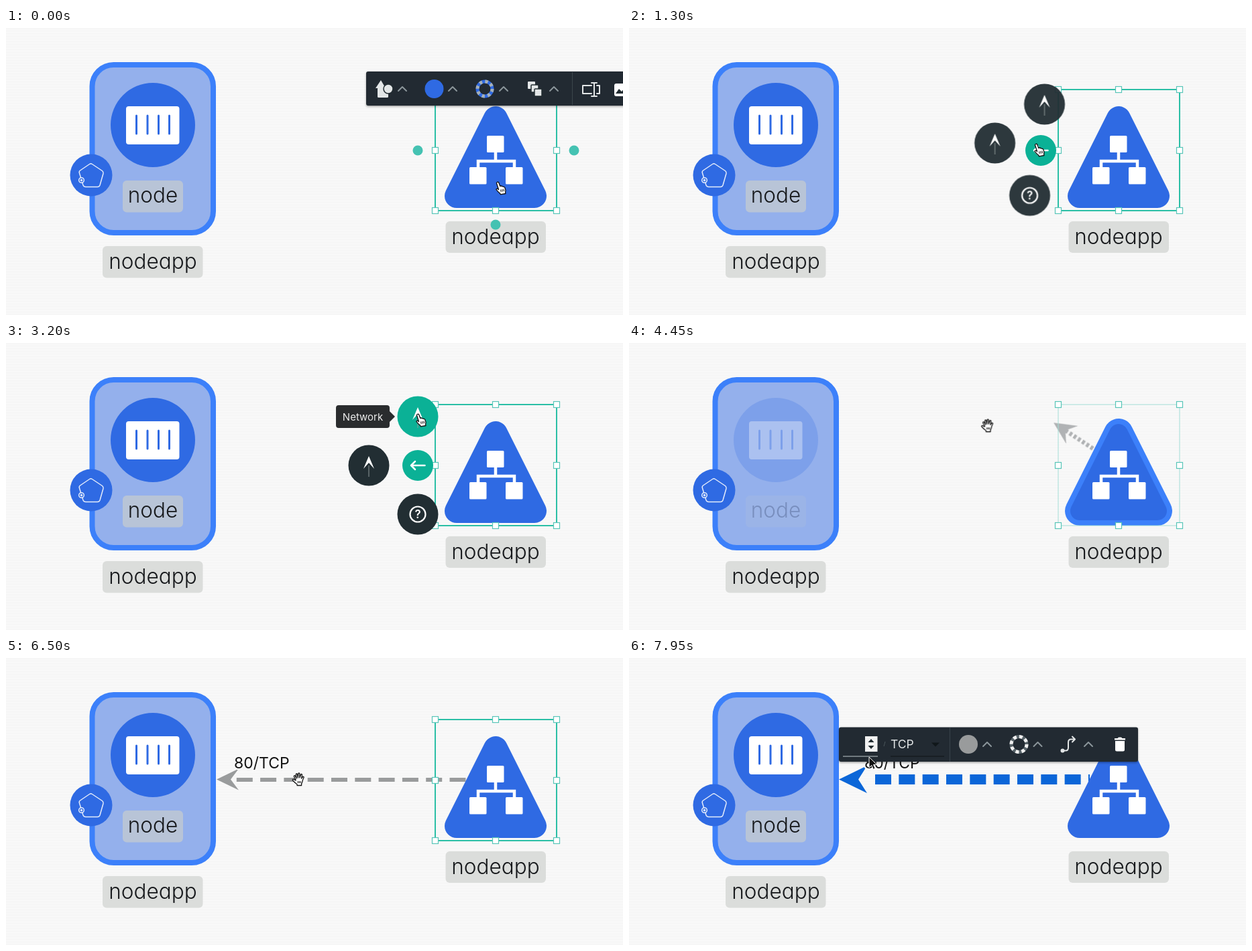
These frames come from a looping animation (920 by 429 pixels, 8000 ms). An HTML page:

```html
<!DOCTYPE html>
<html lang="en">
<head>
<meta charset="utf-8">
<title>Connecting nodes</title>
<style>
  html, body { margin: 0; width: 100%; height: 100%; overflow: hidden; background: #f7f7f7; }
  svg { display: block; width: 100vw; height: 100vh; font-family: Inter, "Open Sans", sans-serif; }
  .name { font-size: 31.5px; font-weight: 350; fill: #17191c; text-anchor: middle; font-feature-settings: "cv11"; }
  .tip { font-size: 15px; fill: #ececec; text-anchor: middle; font-feature-settings: "cv11"; }
  .port { font-size: 23px; fill: #141414; stroke: #f9f9f9; stroke-width: 5px; stroke-linejoin: round; paint-order: stroke; }
  .line { fill: none; stroke-linecap: round; stroke-linejoin: round; }
  .dark { fill: #222c31; }

  /* hard on/off changes */
  .step { animation: 8s step-end infinite; }
  .first { animation-name: first; }
  .full { animation-name: full; }
  .dim { animation-name: dim; }
  .handles { animation-name: handles; }
  .tipA { animation-name: tipA; }
  .tipN { animation-name: tipN; }
  .hoverA { animation-name: hoverA; }
  .hoverN { animation-name: hoverN; }
  .link { animation-name: link; }
  .picked { animation-name: picked; }
  .point { animation-name: point; }
  .grab { animation-name: grab; }
  .arrow { animation-name: arrow; }
  @keyframes first { 0% { opacity: 1 } 12.5%, 100% { opacity: 0 } }
  @keyframes full { 0% { opacity: 1 } 45.6% { opacity: 0 } 74.4% { opacity: 1 } 96.25%, 100% { opacity: 0 } }
  @keyframes dim { 0% { opacity: 0 } 45.6% { opacity: 1 } 74.4%, 100% { opacity: 0 } }
  @keyframes handles { 0% { opacity: 1 } 96.25%, 100% { opacity: 0 } }
  @keyframes tipA { 0% { opacity: 0 } 26.9% { opacity: 1 } 34.4%, 100% { opacity: 0 } }
  @keyframes tipN { 0% { opacity: 0 } 38.1% { opacity: 1 } 45.6%, 100% { opacity: 0 } }
  @keyframes hoverA { 0% { fill: #222e33 } 26.2% { fill: #0bb196 } 34.4%, 100% { fill: #222e33 } }
  @keyframes hoverN { 0% { fill: #222e33 } 37.5% { fill: #0bb196 } 45.6%, 100% { fill: #222e33 } }
  @keyframes link { 0% { opacity: 0 } 74.4% { opacity: 1 } 96.25%, 100% { opacity: 0 } }
  @keyframes picked { 0% { opacity: 0 } 96.25%, 100% { opacity: 1 } }
  @keyframes point { 0% { opacity: 1 } 45.6%, 100% { opacity: 0 } }
  @keyframes grab { 0% { opacity: 0 } 45.6% { opacity: 1 } 97.5%, 100% { opacity: 0 } }
  @keyframes arrow { 0% { opacity: 0 } 97.5%, 100% { opacity: 1 } }

  /* dial items fan out from the right, angle and radius together */
  .item { animation: fan 8s cubic-bezier(.215, .61, .355, 1) infinite; }
  .hub { animation: hub 8s cubic-bezier(.215, .61, .355, 1) infinite; }
  @keyframes fan {
    0%, 13% { opacity: 0; transform: rotate(0deg) translateX(0px) rotate(0deg) }
    18%, 45.6% { opacity: 1; transform: rotate(var(--a)) translateX(73px) rotate(calc(-1 * var(--a))) }
    45.61%, 100% { opacity: 0; transform: rotate(var(--a)) translateX(73px) rotate(calc(-1 * var(--a))) }
  }
  @keyframes hub {
    0%, 12.49% { opacity: 0; transform: scale(.36) }
    12.5% { opacity: 1; transform: scale(.36) }
    15%, 45.6% { opacity: 1; transform: scale(1) }
    45.61%, 100% { opacity: 0; transform: scale(1) }
  }

  .inside { animation: inside 8s linear infinite; }
  @keyframes inside { 0%, 45.6% { opacity: 1 } 48%, 74.2% { opacity: .22 } 75.6%, 100% { opacity: 1 } }

  /* dragged connector: swing and reach */
  .swing { animation: swing 8s ease-in-out infinite; }
  .reach { animation: reach 8s ease-in-out infinite; }
  .drag { animation: drag 8s step-end infinite; }
  @keyframes drag { 0% { opacity: 0 } 46.5% { opacity: 1 } 74.4%, 100% { opacity: 0 } }
  @keyframes swing { 0%, 55.7% { transform: rotate(33.4deg) } 61.9%, 100% { transform: rotate(.2deg) } }
  @keyframes reach { 0%, 55.7% { transform: translateX(-116px) } 61.9%, 100% { transform: translateX(-416px) } }

  .bar2 { animation: bar2 8s linear infinite; }
  @keyframes bar2 { 0%, 96.25% { opacity: 0 } 98.2%, 100% { opacity: 1 } }

  .cursor { animation: cursor 8s ease-in-out infinite; }
  @keyframes cursor {
    0%, 4% { transform: translate(729px, 229px) }
    12% { transform: translate(606px, 174px) }
    16%, 22.5% { transform: translate(603px, 172px) }
    26.9%, 33.75% { transform: translate(536px, 165px) }
    38.75%, 46% { transform: translate(610px, 105px) }
    52.5% { transform: translate(600px, 106px); animation-timing-function: ease-in }
    55.63% { transform: translate(525px, 113px); animation-timing-function: ease-out }
    62%, 74.4% { transform: translate(215px, 186px) }
    80%, 84.4% { transform: translate(426px, 171px) }
    93.75%, 96.25% { transform: translate(398px, 170px) }
    99.2%, 100% { transform: translate(358px, 148px) }
  }
</style>
</head>
<body>
<svg viewBox="0 0 920 429">
  <defs>
    <pattern id="linen" width="4" height="4" patternUnits="userSpaceOnUse">
      <rect width="4" height="4" fill="#f8f8f8"/>
      <rect width="4" height="1" fill="#f5f5f5"/>
    </pattern>
    <filter id="shade" x="-5%" y="-20%" width="110%" height="150%">
      <feDropShadow dx="0" dy="1.5" stdDeviation="1.5" flood-opacity=".35"/>
    </filter>
    <clipPath id="left"><rect x="-700" y="-60" width="700" height="120"/></clipPath>
    <path id="tri" d="M730 135 788 251H672Z" stroke-linejoin="round"/>
    <path id="head" d="M0 0 33-16 21 0 33 16Z"/>
    <path id="chev" class="line" d="M-6 3 0-3 6 3" stroke="#8b959a" stroke-width="2"/>
    <rect id="grip" x="-4.5" y="-4.5" width="9" height="9" fill="#fff" stroke="#58c5b8" stroke-width="1.2"/>
    <g id="up">
      <path d="M0 0V17" stroke="#8d9699" stroke-width="1"/>
      <path d="M0-14 8 5 0-4-8 5Z" fill="#fff"/>
    </g>
  </defs>

  <rect width="920" height="429" fill="url(#linen)"/>

  <!-- container group -->
  <rect x="128.5" y="55" width="180.500" height="251" rx="32" fill="#94b0ec" stroke="#3c80fa" stroke-width="8"/>
  <g class="inside">
    <circle cx="219" cy="145" r="63" fill="#2f6ae3"/>
    <rect x="179" y="117" width="79.500" height="57" rx="4" fill="#fff"/>
    <path class="line" d="M194.500 131V158M211 131V158M227.500 131V158M243.500 131V158" stroke="#2f6ae3" stroke-width="3"/>
    <rect x="174" y="228" width="90" height="47.500" rx="6" fill="#b8c4d7"/>
    <text class="name" x="219" y="261">node</text>
  </g>
  <circle cx="127" cy="220" r="31.500" fill="#2f6ae3"/>
  <g class="line" stroke="#e4ecfb" stroke-width="1.500">
    <path d="M124.500 203.500Q126.500 202 128.500 203.500L143.500 213.500Q145.500 215 145 217.500L140 235Q139 237.500 136.500 237.500H119Q116 237.500 115 235L109.500 217Q108.500 214.500 110.500 213Z"/>
    <circle cx="112.500" cy="227.500" r="3.800" fill="#2f6ae3"/>
    <circle cx="112.500" cy="227.500" r="1"/>
  </g>
  <rect x="144" y="326" width="149.500" height="47.500" rx="6" fill="#dbdddb"/>
  <text class="name" x="219" y="360">nodeapp</text>

  <!-- dragged connector -->
  <g class="drag" fill="#b0b2b4">
    <g transform="translate(730 183)">
      <g class="swing">
        <g clip-path="url(#left)">
          <g class="reach">
            <path d="M21 0H430" stroke="#b0b2b4" stroke-width="6.500" stroke-dasharray="4.300 3.200"/>
            <use href="#head"/>
          </g>
        </g>
      </g>
    </g>
  </g>

  <!-- finished connector -->
  <g class="step link">
    <path d="M343.800 182H686" stroke="#999b9c" stroke-width="6" stroke-dasharray="24 11.300"/>
    <use href="#head" x="314" y="181.500" fill="#999b9c"/>
    <text class="port" x="340" y="165">80/TCP</text>
  </g>
  <g class="step picked">
    <path d="M367 181.500H687" stroke="#0b66d8" stroke-width="15" stroke-dasharray="24 11.330"/>
    <path d="M313 181.500 355 161 342 181.500 355 202Z" fill="#0b66d8"/>
    <text class="port" x="351" y="164.500">80/TCP</text>
  </g>

  <!-- triangle -->
  <use href="#tri" fill="#2f6ae3" stroke="#2f6ae3" stroke-width="36"/>
  <g class="step dim">
    <use href="#tri" fill="#3c80fa" stroke="#3c80fa" stroke-width="44"/>
    <use href="#tri" fill="#2f6ae3" stroke="#2f6ae3" stroke-width="28"/>
  </g>
  <g fill="#fff">
    <rect x="717" y="161" width="25.500" height="25" rx="1.500"/>
    <rect x="691" y="208" width="25.500" height="25.500" rx="1.500"/>
    <rect x="745" y="208" width="25.500" height="25.500" rx="1.500"/>
    <path d="M730 185V199M704 209V199H758V209" fill="none" stroke="#fff" stroke-width="4.500"/>
  </g>
  <rect x="655.500" y="289" width="149.500" height="47" rx="6" fill="#dbdddb"/>
  <text class="name" x="730" y="322.500">nodeapp</text>

  <!-- selection -->
  <rect class="step full" x="640" y="92" width="181" height="181" fill="none" stroke="#2bbfa6" stroke-width="2"/>
  <rect class="step dim" x="640" y="92" width="181" height="181" fill="none" stroke="#a3ddd6" stroke-width="1"/>
  <g class="step handles">
    <use href="#grip" x="640" y="92"/><use href="#grip" x="730" y="92"/><use href="#grip" x="821" y="92"/>
    <use href="#grip" x="640" y="183"/><use href="#grip" x="821" y="183"/>
    <use href="#grip" x="640" y="273"/><use href="#grip" x="730" y="273"/><use href="#grip" x="821" y="273"/>
  </g>
  <g class="step first" fill="#45c2b2">
    <circle cx="614" cy="183" r="7.500"/><circle cx="847" cy="183" r="7.500"/><circle cx="730" cy="294" r="7.500"/>
  </g>

  <!-- shape toolbar -->
  <g class="step first">
    <rect class="dark" x="537" y="65" width="400" height="51" rx="3" filter="url(#shade)"/>
    <g fill="#e3e6e7">
      <path d="M559 78 566 90H551Z"/>
      <rect x="554" y="89" width="16" height="15" rx="1.500"/>
      <circle cx="570" cy="91" r="7" stroke="#222c31" stroke-width="1.500"/>
      <rect x="778" y="80" width="11" height="11" rx="1"/>
      <rect x="783" y="85" width="11" height="11" rx="1" stroke="#222c31" stroke-width="1.500"/>
      <rect x="788" y="91" width="11" height="11" rx="1" stroke="#222c31" stroke-width="1.500"/>
    </g>
    <circle cx="638.500" cy="91" r="14" fill="#2f6ae3"/>
    <circle cx="714" cy="91" r="11" fill="none" stroke="#2f6ae3" stroke-width="5"/>
    <circle cx="714" cy="91" r="11" fill="none" stroke="#a5b0b8" stroke-width="5" stroke-dasharray="4.320"/>
    <use href="#chev" x="591" y="91"/><use href="#chev" x="666" y="91"/>
    <use href="#chev" x="742" y="91"/><use href="#chev" x="817" y="91"/>
    <path d="M844.500 66V115" stroke="#3a454a"/>
    <path class="line" d="M873 86H860V98H873M881 86H885V98H881M873 82H881M877 82V102M873 102H881" stroke="#e3e6e7" stroke-width="2"/>
    <rect x="907" y="83" width="22" height="19" rx="3" fill="#fff"/>
    <path class="dark" d="M909 98 914 91 918 95 922 90V98Z"/>
  </g>

  <!-- radial menu -->
  <g transform="translate(614 183)">
    <g class="item" style="--a:-270deg">
      <circle r="30.500" fill="#222e33"/>
      <circle r="11.500" fill="none" stroke="#fff" stroke-width="2.200"/>
      <text y="6" font-size="17" font-weight="600" text-anchor="middle" fill="#fff">?</text>
    </g>
    <g class="item" style="--a:-180deg">
      <circle class="step hoverA" r="30.500" fill="#222e33"/>
      <use href="#up"/>
    </g>
    <g class="item" style="--a:-90deg">
      <circle class="step hoverN" r="30.500" fill="#222e33"/>
      <use href="#up"/>
    </g>
    <g class="hub">
      <circle r="23" fill="#0bb196"/>
      <path class="line" d="M10.500 0H-10M-4-6-10 0-4 6" stroke="#fff" stroke-width="2.500"/>
    </g>
  </g>
  <g class="step tipA">
    <path d="M405 165H494.500Q498.500 165 498.500 169V175L507 183 498.500 191V195Q498.500 199 494.500 199H405Q401 199 401 195V169Q401 165 405 165Z" fill="#2a2c2e"/>
    <text class="tip" x="450" y="188">Annotation</text>
  </g>
  <g class="step tipN">
    <path d="M496 93H568Q572 93 572 97V102L580 110 572 118V123Q572 127 568 127H496Q492 127 492 123V97Q492 93 496 93Z" fill="#2a2c2e"/>
    <text class="tip" x="532" y="115.500">Network</text>
  </g>

  <!-- connector toolbar -->
  <g class="bar2">
    <rect class="dark" x="313" y="103.500" width="446" height="51.500" rx="3" filter="url(#shade)"/>
    <path d="M319 147H371" stroke="#8b9499" stroke-width="1.500"/>
    <path d="M390 147H470" stroke="#141b1f" stroke-width="1.500"/>
    <rect x="352" y="117" width="18.500" height="23" fill="#f2f2f2"/>
    <path class="dark" d="M361 121 365.500 126H356.500ZM361 136 365.500 131H356.500Z"/>
    <path d="M380 132 382 125" stroke="#4b565b"/>
    <text x="390" y="135" font-size="17.500" fill="#e3e6e7">TCP</text>
    <path d="M451 126.500H463L457 132.500Z" fill="#10171a"/>
    <path d="M478.500 104V155" stroke="#38434a"/>
    <circle cx="506" cy="129" r="14" fill="#999b9c"/>
    <circle cx="581.500" cy="129" r="11.500" fill="none" stroke="#59646a" stroke-width="5"/>
    <circle cx="581.500" cy="129" r="11.500" fill="none" stroke="#f0f0f0" stroke-width="5" stroke-dasharray="5 4.030"/>
    <use href="#chev" x="534" y="129"/><use href="#chev" x="609.500" y="129"/><use href="#chev" x="685" y="129"/>
    <g class="line" stroke="#e3e6e7" stroke-width="2">
      <circle cx="646.500" cy="138.500" r="2" fill="#e3e6e7"/>
      <path d="M648 138.500H651Q655 138.500 655 134V126Q655 121.500 659 121.500H664M661 117.500 665 121.500 661 125.500"/>
    </g>
    <path d="M724 120H728.500L730 118.500H734L735.500 120H740V122.500H724ZM725 124H739V137Q739 139.500 736.500 139.500H727.500Q725 139.500 725 137Z" fill="#fff"/>
  </g>

  <!-- cursor -->
  <g class="cursor" fill="#fff" stroke="#111" stroke-width="1.300" stroke-linejoin="round">
    <g class="step point">
      <path d="M3.500 1.500c1-.6 2 0 2.400 1l1.900 5 .8-.3c.9-.4 1.600 0 1.900.6.9-.4 1.800 0 2.100.7 1-.3 1.900.2 2.300 1.200l.9 3c.3 1.600 0 2.600-.2 3.700l.3 2.100-7.600 1.300-.7-1.700c-1.800-1-3.600-3-5.300-5.200-.8-1.200.6-2.300 1.900-1.500l1.300 1.100L2.600 3.200c-.3-.8.1-1.400.9-1.700z"/>
      <path d="M8.500 12.500 9.300 16M10.700 12 11.500 15.600M12.900 11.600 13.600 15" stroke-width="1"/>
    </g>
    <g class="step grab">
      <path d="M6 11 3.400 6.200c-.5-1.200 1.200-2 1.900-.9L7.200 9 6.400 3.200c-.2-1.400 1.700-1.700 2-.3L9.400 8 9.800 2c.1-1.400 2-1.300 2 0L12 8l1.600-4.800c.4-1.200 2.200-.7 1.900.6L14.600 9l1.800-2.300c.9-1 2.200 0 1.600 1.100-1.400 2.600-1.700 4-2.200 6.400l-1.200 2.800v2.500H8.200l-.4-2C5.800 16.400 3.600 14.200 1.600 12c-.9-1.200.6-2.300 1.800-1.400L6 12z"/>
      <path d="M9.300 13V16M11.300 13V16M13.200 13V16" stroke-width="1"/>
    </g>
    <path class="step arrow" d="M0 0V16L3.800 12.400 6.300 18.300 9 17.100 6.500 11.400H11.500Z" fill="#111" stroke="#f4f4f4" stroke-width="1"/>
  </g>
</svg>
</body>
</html>
```
